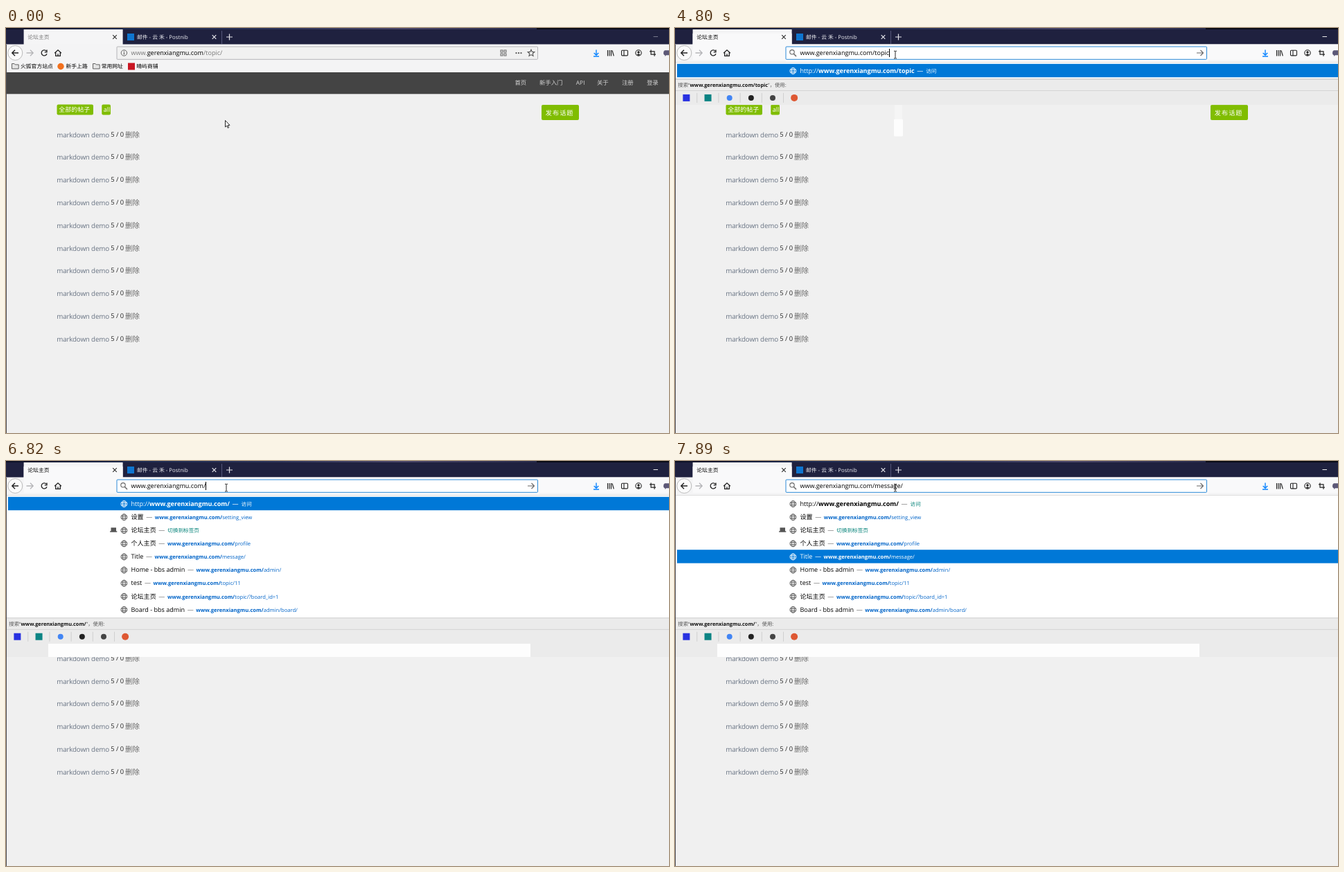
These frames come from a looping animation (957x585 px, 8000 ms). An HTML page:

```html
<!DOCTYPE html>
<html lang="zh-CN">
<head>
<meta charset="utf-8">
<title>论坛主页</title>
<style>
html, body { margin: 0; width: 100%; height: 100%; overflow: hidden; background: #f0f0f0; }
svg { display: block; width: 100%; height: 100%; }
text { font-family: "Open Sans", "Noto Sans CJK SC", "Noto Sans CJK", sans-serif; white-space: pre; text-rendering: geometricPrecision; }
.line { fill: none; stroke: #222; stroke-width: 1.1; }
.small { font-size: 7.8px; }
.main { font-size: 9.06px; }
.link { font-size: 7.6px; }
.bold { font-weight: 700; }
</style>
</head>
<body>
<svg viewBox="0 0 957 585" preserveAspectRatio="none">
  <defs>
    <linearGradient id="desk">
      <stop offset="0" stop-color="#0c0f22"/><stop offset=".25" stop-color="#1d2a50"/>
      <stop offset=".5" stop-color="#2b3358"/><stop offset=".75" stop-color="#4a4668"/>
      <stop offset="1" stop-color="#252848"/>
    </linearGradient>
    <path id="folder" d="M.5 -3.5h3.5l1.2 1.4h5v6H.5z" fill="#e4e4e4" stroke="#555" stroke-width=".9"/>
    <path id="cross" d="M-2.8 -2.8L2.8 2.8M2.8 -2.8L-2.8 2.8"/>
    <g id="globe" fill="none" stroke-width=".9">
      <circle r="4.4"/><ellipse rx="2" ry="4.4"/><path d="M-4.1 -1.5H4.1M-4.1 1.5H4.1"/>
    </g>
  </defs>

  <rect width="957" height="585" fill="#f0f0f0"/>
  <g id="page">
    <rect y="64" width="957" height="31.3" fill="#444"/>
    <g id="nav" fill="#d4d4d4" font-size="8.4"></g>
    <g fill="#80bd01">
      <rect x="73.5" y="110.5" width="52.5" height="15" rx="2"/>
      <rect x="138.3" y="110.5" width="12.7" height="15" rx="2"/>
      <rect x="773" y="111" width="54" height="22" rx="2"/>
    </g>
    <g fill="#fff">
      <text x="76.2" y="121.3" font-size="9">全部的帖子</text>
      <text x="140.8" y="121.3" font-size="9">all</text>
      <text x="778.8" y="125.8" font-size="9.2" letter-spacing="1">发布话题</text>
    </g>
    <g id="topics"></g>
  </g>
  <g id="trail"></g>

  <rect width="957" height="24" fill="#1f213f"/>
  <rect width="957" height="2" fill="#090a14"/>
  <rect width="766" height="2" fill="url(#desk)"/>
  <rect x="25.6" y="2" width="143" height="22" fill="#f5f5f6"/>
  <rect y="23.5" width="957" height="40" fill="#f4f4f5"/>
  <g id="patch"></g>
  <use href="#cross" x="157" y="13" stroke="#333" stroke-width="1.2"/>
  <rect x="175" y="8" width="10" height="10" fill="#0f75cf"/>
  <text class="small" x="189" y="16" fill="#f0f0f5">邮件 - 云 禾 - Postnib</text>
  <g stroke="#e4e4ea" stroke-width="1.2">
    <use href="#cross" x="300.5" y="13"/>
    <path d="M318 13h9M322.5 8.5v9"/>
    <path d="M311.5 4V23" stroke="#55577a" stroke-width="1"/>
  </g>

  <circle cx="13.3" cy="36" r="10.5" fill="#fbfbfb" stroke="#b4b4b4" stroke-width=".9"/>
  <g class="line">
    <path d="M18 36H9M13 31.8L8.8 36L13 40.2" stroke-width="1.4"/>
    <path d="M29.5 36H39M35 31.8L39.2 36L35 40.2" stroke="#b5b5b8" stroke-width="1.3"/>
    <path d="M58.2 33.3A4 4 0 1 0 59 37.2M59 31.5V34.8H55.7" stroke-width="1.3"/>
    <path d="M70.2 36.3L75 31.8L79.8 36.3M71.7 35.5V40.3H78.3V35.5M75 40V37.3" stroke-width="1.3"/>
    <path d="M852 31.5V39M848.7 36L852 39.2L855.3 36M848 41H856" stroke="#0a84ff" stroke-width="1.4"/>
    <path d="M868.5 32V40.5M871 32V40.5M873.5 32V40.5M875 32.3L877.3 40.4" stroke-width="1.2"/>
    <rect x="888.5" y="32.3" width="9" height="7.6" rx="1.2"/><path d="M892 32.3V40"/>
    <circle cx="913" cy="36" r="4.2"/>
    <path d="M931 31.5V38.2H938M929 33.8H936V40.8" stroke-width="1.2"/>
  </g>
  <path d="M910.3 38.8q2.7 -3.2 5.4 0l-2.7 1.3z" fill="#222"/><circle cx="913" cy="35" r="1.7" fill="#222"/>
  <path d="M951 32.3H957V39.3H953L951.2 41V39.3Q949 39 949 36T951 32.3" fill="#5c5877"/>

  <use href="#folder" x="8" y="55"/>
  <circle cx="79" cy="55.5" r="4.7" fill="#f1701d"/>
  <use href="#folder" x="125" y="55"/>
  <rect x="176" y="50.5" width="10" height="10" fill="#c91623"/>
  <g class="small" fill="#000">
    <text x="21" y="58.4">火狐官方站点</text><text x="86.5" y="58.4">新手上路</text>
    <text x="137.7" y="58.4">常用网址</text><text x="188.3" y="58.4">晴屿商铺</text>
  </g>

  <g id="chrome"></g>
  <text id="url" class="main" x="180.5" y="39.3"></text>
  <rect id="caret" y="30" width="1" height="12"/>
  <g id="popup"></g>
  <path d="M.5 24V585" stroke="#4b4b52"/>
  <g id="pointer"></g>
</svg>
<script>
const LOOP = 8000, HOST = 'www.gerenxiangmu.com', PITCH = 19.1, TEXT_X = 180.5;
const $ = id => document.getElementById(id);
const rect = (x, y, w, h, fill, more = '') =>
  `<rect x="${x}" y="${y}" width="${w}" height="${h}" fill="${fill}" ${more}/>`;
const span = (s, fill, cls = '', dx = 0) =>
  `<tspan fill="${fill}" class="${cls}" dx="${dx}">${s}</tspan>`;
const latest = (table, t) => table.filter(row => row[0] <= t).pop();

$('nav').innerHTML = [['首页', 734.5], ['新手入门', 770], ['API', 822.8], ['关于', 853], ['注册', 889], ['登录', 925]]
  .map(([s, x]) => `<text x="${x}" y="82.4">${s}</text>`).join('');

$('topics').innerHTML = Array.from({ length: 10 }, (_, i) => {
  const y = 157.6 + i * 32.8;
  return `<text x="73.2" y="${y}" font-size="9.8" letter-spacing="-.17" fill="#687383">markdown demo</text>
    <text x="151.3" y="${y - 1}" font-size="9.3" fill="#222">5 / 0</text>
    <text x="172" y="${y}" font-size="10.4" fill="#686868">删除</text>`;
}).join('');

// Suggestions: [title, path]; "visit" and "tab" are special rows.
const visit = ['visit'], tab = ['tab'], home = '论坛主页';
const topicRows = [visit, tab, ['test', 'topic/11'],
  ...[1, 3, 2].map(n => [home, 'topic/?board_id=' + n]),
  ['bbs club', 'topic/new?board_id=-1'], ['geren', 'topic/12'],
  ['bbs club', 'topic/new?board_id=3'], [HOST, 'topic?board_id=1']];
const siteRows = [visit, ['设置', 'setting_view'], tab, ['个人主页', 'profile'], ['Title', 'message/'],
  ['Home - bbs admin', 'admin/'], ['test', 'topic/11'], [home, 'topic/?board_id=1'],
  ['Board - bbs admin', 'admin/board/']];

// [time, address path, query, matched part, rows, selected row]
const typing = [
  [0, 'topic/'],
  [4800, 'topic', 'topic', '', [visit], 0],
  [4920, 'topi', 'topi', 'topi', topicRows, 0],
  [5070, 'top', 'top', 'top', topicRows, 0],
  [5220, 'to', 'to', 'top', topicRows, 0],
  [5340, 'to', 'to', 'to', topicRows, 0],
  [5490, 't', 't', 'to', topicRows, 0],
  [5610, 't', 't', 't', topicRows, 0],
  [5880, '', '', 't', topicRows, 0],
  [6010, '', '', '', siteRows, 0],
  [7380, 'setting_view', '', '', siteRows, 1],
  [7500, 'topic/', '', '', siteRows, 2],
  [7620, 'profile', '', '', siteRows, 3],
  [7740, 'message/', '', '', siteRows, 4]
];
const blink = [[0, 0], [3840, 1], [4240, 0], [4800, 1], [6290, 0], [6820, 1], [7380, 0], [7500, 1], [7890, 0]];
const moves = [[0, 316, 133], [150, 317, 136], [270, 318, 140], [390, 319, 144], [550, 322, 140],
  [980, 320.5, 136], [1130, 320, 107], [1280, 319, 85], [1410, 316, 62], [1530, 314, 47],
  [1670, 314.5, 38.5], [1830, 316, 38.5], [1950, 318, 38.5]];

function pointer(t) {
  const [time, x, y] = latest(moves, t);
  const d = time < 1670
    ? 'M.5 .5V10L2.7 8L4.2 11.4L5.7 10.7L4.2 7.4H7Z'
    : 'M-2 -5.2H-.6L0 -4.6L.6 -5.2H2M0 -4.6V4.8M-2 5.4H-.6L0 4.8L.6 5.4H2';
  return `<path d="${d}" transform="translate(${x} ${y})" fill="${time < 1670 ? '#fff' : 'none'}" stroke="#111" stroke-width=".9"/>`;
}

function trail(t) {
  let s = '';
  if (t >= 1280) s += rect(317, 95, 10, 9.5, '#e0e0e0');
  if (t >= 1130) s += rect(317, 104.5, 11, 27, '#f5f5f5');
  if (t >= 150) s += rect(316, 131.5, t < 550 ? 10 : 13, 25, '#fdfdfd', 'rx="1.5"');
  return t < 4920 ? s : '';
}

function patch(t) {
  const focused = t >= 3280;
  return (t >= 1670 ? rect(160, 45, 610, 14, '#f9f9f9') : '')
    + (focused ? rect(25.6, 23.5, 931.4, 22.5, '#f9f9fa') + rect(25.6, 8, 143, 16, '#f9f9fa') : '')
    + `<text class="small" x="31.3" y="16" fill="${focused ? '#000' : '#777'}">${home}</text>`
    + `<path d="M934.5 12.5H941" stroke="${focused ? '#eee' : '#77798c'}"/>`;
}

function chrome(t) {
  const focused = t >= 3280, open = t >= 4800;
  const fill = focused ? '#fff' : t >= 1670 ? '#fafafa' : '#f1f1f1';
  let s = rect(160, 27, 607.5, 18.3, fill, `stroke="${focused ? '#2a8ad8' : '#b5b5b8'}" rx="1"`);
  if (t >= 3280 && t < 3840) s += rect(180, 30, 133.5, 12, '#0078d7');
  if (open) return s + `<g class="line" style="stroke:#666"><circle cx="169" cy="34.8" r="3.2"/>
    <path d="M171.3 37.2L175 41" stroke-width="1.5"/><path d="M753 36H762M758.5 32L762.5 36L758.5 40"/></g>`;
  const cells = [[714, 32], [719, 32], [714, 37], [719, 37]]
    .map(([x, y]) => rect(x, y, 3, 3, 'none', 'stroke="#666"')).join('');
  const dots = [736.5, 740, 743.5].map(x => `<circle cx="${x}" cy="36.2" r="1.1" fill="#555"/>`).join('');
  return s + cells + dots + `<g class="line" style="stroke:#555">
    <circle cx="170.4" cy="36" r="4.2" stroke-width=".9"/><path d="M170.4 35.3V38.4M170.4 33.3V34.4"/>
    <path d="M758 31.2L759.4 34.4L762.8 34.7L760.2 37L761 40.4L758 38.6L755 40.4L755.8 37L753.2 34.7L756.6 34.4Z"/>
    ${t >= 1670 ? '<path d="M700.5 34.3L704 37.8L707.5 34.3" stroke-width="1.3"/><path d="M726.5 30V42" style="stroke:#ddd"/>' : ''}</g>`;
}

function address(t, path) {
  if (t < 3280) return span('www.', '#777') + span(HOST.slice(4), '#000') + span('/' + path, '#777');
  return span(HOST + '/' + path, t < 3840 ? '#fff' : '#000');
}

function suggestion([title, path], i, query, match, selected) {
  const y = 52 + i * PITCH, on = i === selected;
  const ink = c => on ? '#fff' : c;
  const dash = span('—', ink('#777'), '', 3.6);
  const teal = s => span(s, ink('#008077'), 'link', 4);
  let s = on ? rect(3, y - .2, 954, 19.4, '#0078d7') : '', label;
  if (title === 'visit') {
    label = span('http://', ink('#000')) + span(`${HOST}/${query}`, ink('#000'), 'bold') + dash + teal('访问');
  } else if (title === 'tab') {
    label = span(home, ink('#000')) + dash + teal('切换到标签页');
    s += `<path d="M151.5 ${y + 6}h7.5v5h1.3v1.5h-10.2v-1.5h1.4z" fill="${ink('#555')}"/>`;
  } else {
    const blue = ink('#0064c8');
    label = span(title, ink('#000')) + dash
      + span(`${HOST}/${match}`, blue, 'link bold', 3.6) + span(path.slice(match.length), blue, 'link');
  }
  return s + `<use href="#globe" x="170.4" y="${y + 10}" stroke="${ink('#505050')}"/>
    <text class="main" x="${TEXT_X}" y="${y + 12.8}">${label}</text>`;
}

function engines(y) {
  const colors = ['#2932e1', '#0c8484', '#4285f4', '#222', '#444', '#de5833'];
  return colors.map((c, i) => {
    const x = 16.4 + i * 31.15;
    const mark = i < 2 ? rect(x - 5, y - 5, 10, 10, c) : `<circle cx="${x}" cy="${y}" r="${i < 5 ? 4 : 5}" fill="${c}"/>`;
    return mark + rect(x + 15, y - 7, .8, 14, i < 5 ? '#c8c8c8' : 'none');
  }).join('');
}

function popup([, , query, match, rows, selected]) {
  if (!rows) return '';
  const top = 54.5 + rows.length * PITCH;
  const leftover = rows === siteRows
    ? rect(0, 263, 957, 20, '#ebebeb') + rect(61, 263, 696, 20, '#fdfdfd') : '';
  return leftover + rect(0, 49, 957, top - 49, '#fff') + rect(0, 49, 957, .8, '#d6d6d6')
    + rows.map((row, i) => suggestion(row, i, query, match, selected)).join('')
    + rect(0, top, 957, 37.5, '#ebebeb') + rect(0, top, 957, .8, '#c8c8c8') + rect(0, top + 16.5, 957, .8, '#cfcfcf')
    + `<text x="4.3" y="${top + 11.6}" font-size="7.35">${span('搜索“', '#555')}${span(`${HOST}/${query}`, '#111', 'bold')}${span('”，使用:', '#555')}</text>`
    + engines(top + 27.3);
}

const shown = {};
function put(id, html) {
  if (shown[id] !== html) $(id).innerHTML = shown[id] = html;
}

function draw() {
  const t = performance.now() % LOOP, step = latest(typing, t);
  put('trail', trail(t));
  put('patch', patch(t));
  put('chrome', chrome(t));
  put('url', address(t, step[1]));
  put('popup', popup(step));
  put('pointer', pointer(t));
  $('caret').setAttribute('x', Math.floor(TEXT_X + $('url').getComputedTextLength()));
  $('caret').setAttribute('opacity', latest(blink, t)[1]);
  requestAnimationFrame(draw);
}
draw();
</script>
</body>
</html>
```
